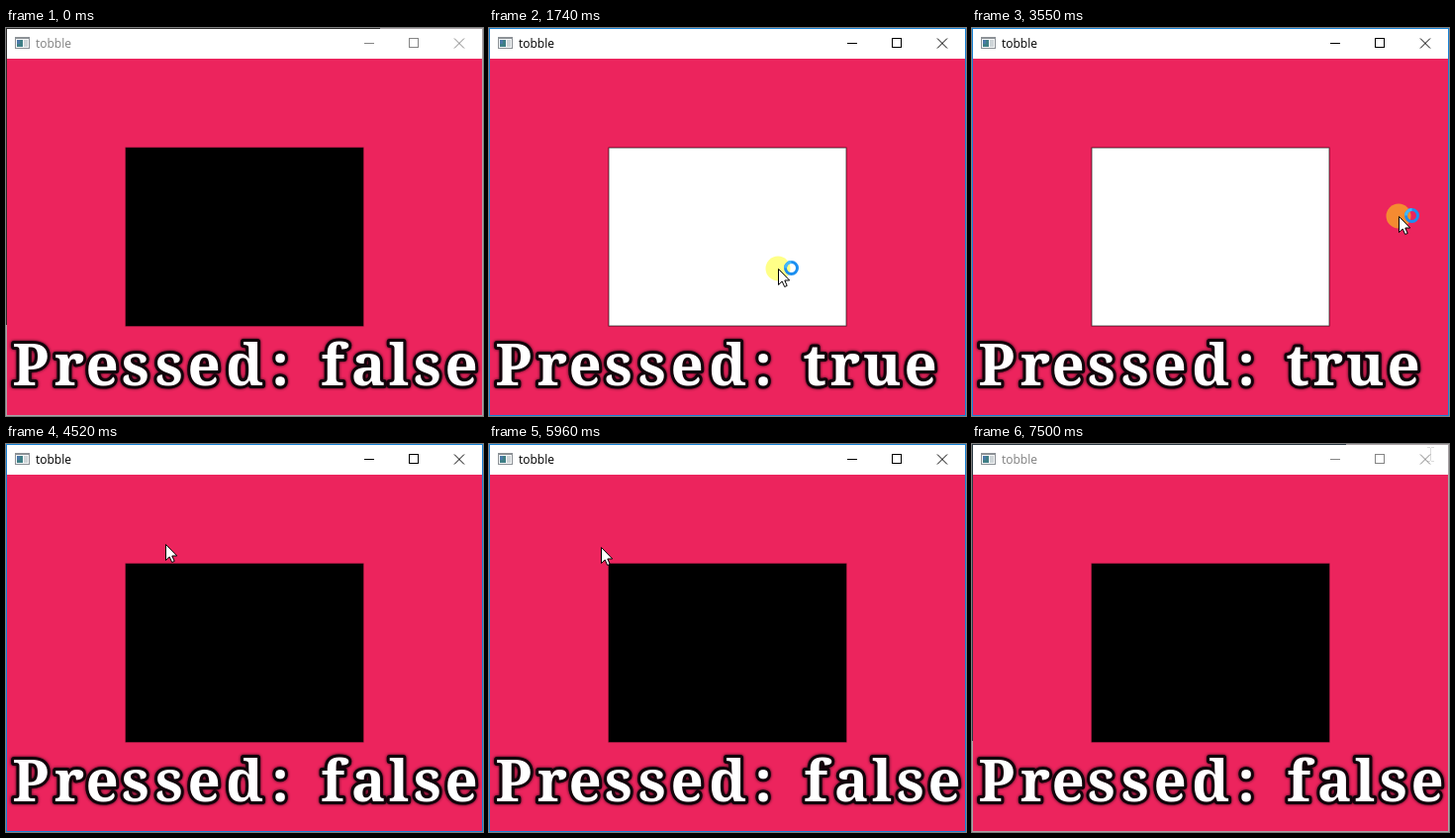
These frames come from a looping animation (482 by 392 pixels, 7570 ms). An HTML page:

```html
<!DOCTYPE html>
<html lang="en">
<head>
<meta charset="utf-8">
<title>Mouse press demo</title>
<style>
  html, body { margin: 0; width: 100%; height: 100%; overflow: hidden; background: #ec245d; }
  svg { display: block; width: 482px; height: 392px; }
  #title { font: 12px "Open Sans", "Noto Sans", sans-serif; }
  .label {
    font: bold 58px "Noto Serif", "DejaVu Serif", serif;
    text-anchor: middle;
    fill: #fff; stroke: #12030a; stroke-width: 6px; stroke-linejoin: round;
    paint-order: stroke;
    filter: drop-shadow(0 0 1.5px rgba(18, 3, 10, .9));
  }
  .crisp { shape-rendering: crispEdges; }
</style>
</head>
<body>
<svg viewBox="0 0 482 392">
  <!-- window edge: active, then idle -->
  <rect id="edge" width="482" height="392" fill="#1883d7"/>
  <g id="idleEdge" class="crisp">
    <rect width="482" height="392" fill="#a9a3a6"/>
    <path id="darkEdge" d="M0 0H378V1H1V300H0Z" fill="#2b2b2b"/>
  </g>

  <!-- title bar -->
  <rect x="1" y="1" width="480" height="30" fill="#fff" class="crisp"/>
  <g class="crisp">
    <rect x="9" y="9" width="15" height="12" fill="#8c9196"/>
    <rect x="10" y="11" width="13" height="9" fill="#f4f6f7"/>
    <rect x="11" y="12" width="6" height="7" fill="#3f7f86"/>
    <rect x="11" y="12" width="3" height="4" fill="#4a78a8"/>
    <rect x="18" y="12" width="4" height="7" fill="#cfd5d8"/>
  </g>
  <text id="title" x="30" y="20">tobble</text>
  <rect id="hover" y="1" width="46" height="29" class="crisp"/>
  <g id="icons" fill="none">
    <path d="M362 15.5h10M407.500 10.500h9v9h-9z" class="crisp"/>
    <path id="cross" d="M453 10.500l10 10M463 10.500l-10 10"/>
  </g>

  <!-- client area -->
  <rect x="1" y="31" width="480" height="360" fill="#ec245d" class="crisp"/>
  <rect id="box" x="121" y="121" width="240" height="180" stroke="#000" stroke-opacity=".65"/>
  <text class="label" y="361" x="25 64 97 131 165 200 241 277">Pressed:</text>
  <text class="label" y="361" id="falseText" x="330 366 397 426 460">false</text>
  <text class="label" y="361" id="trueText" x="329 360 397 436">true</text>

  <!-- pointer, origin at its tip -->
  <g id="pointer">
    <circle id="click" r="12.5" fill="#ff0" fill-opacity=".47"/>
    <path d="M.5 .5V16.500L4.200 13L6.700 18.500L9.200 17.400L6.800 12H11.700Z" fill="#fff" stroke="#000"/>
    <g id="busy" fill="none" stroke-width="3">
      <circle cx="13.500" cy="-.5" r="6" stroke="#1c8ff0"/>
      <path d="M7.500 -.5a6 6 0 0 1 6 -6" stroke="#45b8fa"/>
    </g>
  </g>
  <path id="beam" d="M460 3.500h3M464 3.500h3M463.500 4v13M460 17.500h3M464 17.500h3" stroke="#000" fill="none" class="crisp"/>
</svg>
<script>
const LOOP = 7570;
const $ = id => document.getElementById(id);

// Each move advances in `steps` jumps; keys are [time, x, y].
const MOVES = [
  { steps: 16, keys: [[820, 313, 380], [1004, 304, 322], [1234, 292, 270], [1372, 292, 250], [1510, 292, 243]] },
  { steps: 1, keys: [[1970, 291, 243]] },
  { steps: 3, keys: [[2940, 325, 228], [2990, 388, 204], [3040, 431, 190]] },
  { steps: 15, keys: [[4010, 427, 189], [4222, 320, 150], [4380, 216, 113], [4486, 161, 101], [4644, 113, 102], [4750, 99, 103]] },
  { steps: 1, keys: [[4800, 93, 104]] },
  { steps: 16, keys: [[5590, 93, 104], [5787, 98, 106], [5935, 113, 104], [6083, 190, 84], [6330, 358, 32]] },
  { steps: 10, keys: [[6380, 372, 28], [6517, 415, 19], [6654, 449, 12], [6790, 461, 9]] }
];
const PRESSES = [[1740, 2630], [3550, 4010], [4930, 5590]];
const FOCUS = 1740, BUSY_END = 4010, CLOSE = 7020, CLOSED = 7100;
const FADE = 7150, FADE_STEP = 70, FADE_COUNT = 7;

function along(keys, t) {
  let i = 1;
  while (i < keys.length - 1 && t > keys[i][0]) i++;
  if (keys.length === 1) return keys[0].slice(1);
  const [t0, x0, y0] = keys[i - 1], [t1, x1, y1] = keys[i];
  const p = Math.min(1, Math.max(0, (t - t0) / (t1 - t0)));
  return [Math.round(x0 + (x1 - x0) * p), Math.round(y0 + (y1 - y0) * p)];
}

function pointerAt(t) {
  const move = MOVES.filter(m => m.keys[0][0] <= t).pop();
  if (!move) return null;
  const start = move.keys[0][0], end = move.keys[move.keys.length - 1][0];
  const tick = (end - start) / (move.steps - 1) || 1;
  return along(move.keys, start + Math.floor((t - start) / tick + .1) * tick);
}

const show = (id, on) => { $(id).style.display = on ? "" : "none"; };

function draw(t) {
  const active = t >= FOCUS && t < CLOSED;
  const pressed = PRESSES.some(([a, b]) => t >= a && t < b);
  const closing = t >= CLOSE && t < CLOSED;
  const tip = t < CLOSED ? pointerAt(t) : null;

  show("edge", active);
  show("idleEdge", !active);
  $("darkEdge").setAttribute("fill", t >= CLOSED ? "#2c3a44" : "#2b2b2b");
  $("title").setAttribute("fill", active ? "#000" : "#808080");
  $("icons").setAttribute("stroke", active ? "#000" : "#858585");

  $("box").setAttribute("fill", pressed ? "#fff" : "#000");
  show("trueText", pressed);
  show("falseText", !pressed);

  // Title bar buttons are 46 px wide, starting at x = 344.
  const button = tip && tip[1] < 31 && tip[0] >= 344 ? Math.floor((tip[0] - 344) / 46) : -1;
  show("hover", button >= 0);
  if (button >= 0) {
    $("hover").setAttribute("x", 344 + button * 46 - (button === 2 ? 0 : 0));
    $("hover").setAttribute("width", button === 2 ? 45 : 46);
    $("hover").setAttribute("fill", button < 2 ? "#e5e5e5" : closing ? "#f1707a" : "#e81123");
  }
  $("cross").style.stroke = button === 2 ? "#fff" : "";

  show("pointer", tip);
  if (tip) $("pointer").setAttribute("transform", `translate(${tip})`);
  show("click", pressed || closing);
  show("busy", t < BUSY_END);

  const faded = t < FADE ? 0 : Math.floor((t - FADE) / FADE_STEP) + 1;
  show("beam", t >= CLOSED);
  $("beam").setAttribute("opacity", Math.max(0, 1 - faded / FADE_COUNT));
}

const begin = performance.now();
function frame() {
  draw((performance.now() - begin) % LOOP);
  requestAnimationFrame(frame);
}
draw(0);
requestAnimationFrame(frame);
</script>
</body>
</html>
```
